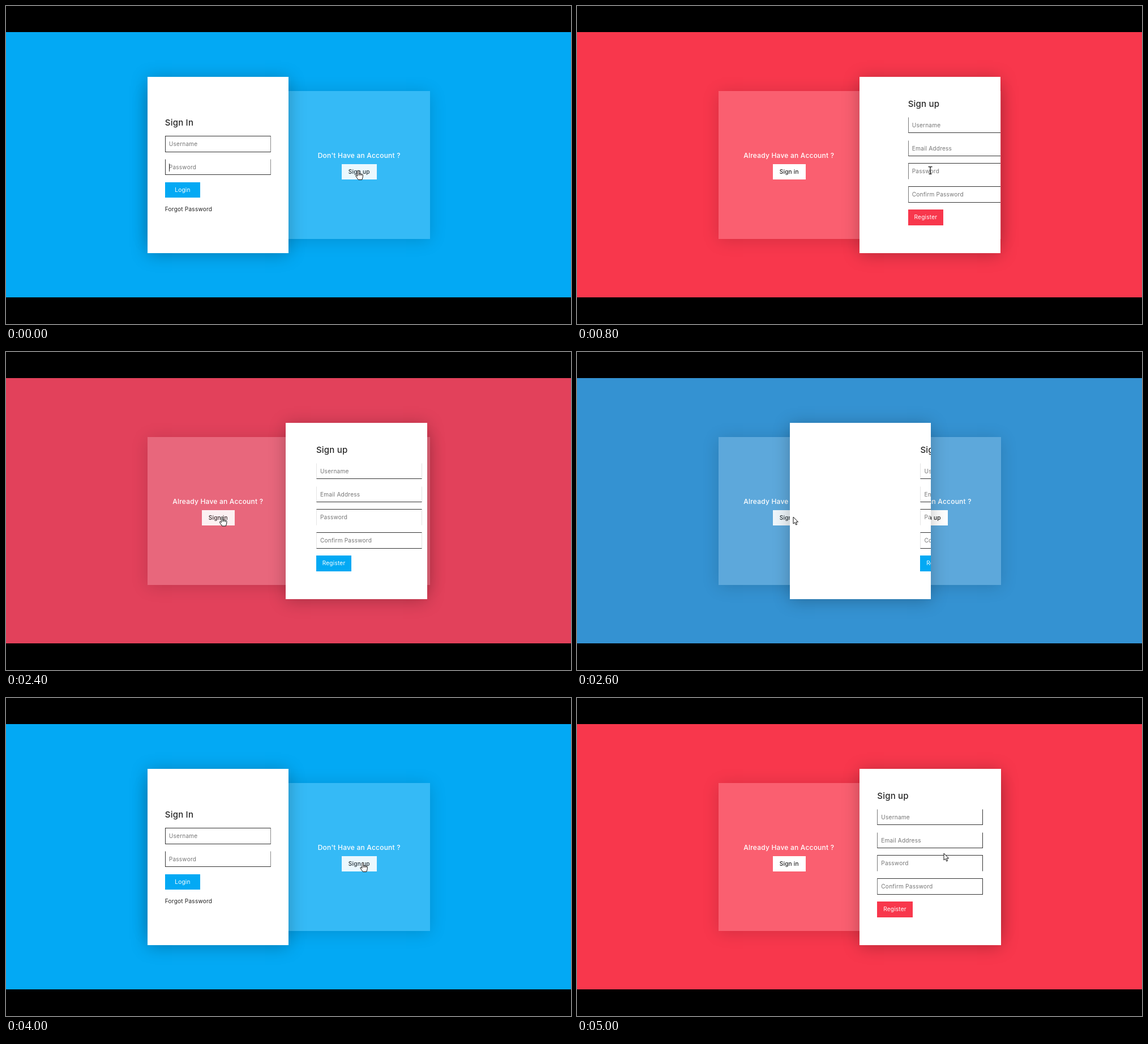
Write an HTML page that moves like this. It is 998x561 px and loops after 5.2 s.

```html
<!DOCTYPE html>
<html lang="en">
<head>
<meta charset="utf-8">
<title>Sign in / Sign up</title>
<style>
  html, body { margin: 0; width: 100%; height: 100%; overflow: hidden; background: #000; }
  #stage { position: relative; width: 998px; height: 561px; overflow: hidden;
    font: 10.1px Inter, sans-serif; letter-spacing: .02em; color: #222; }
  #stage * { position: absolute; box-sizing: border-box; white-space: nowrap; }
  #page { top: 46px; width: 998px; height: 468px; }
  #panel { left: 249.5px; top: 149.5px; width: 499px; height: 261px;
    background: rgba(255,255,255,.2); box-shadow: 0 3px 28px rgba(0,0,0,.15); }
  .box { width: 249.5px; height: 100%; }
  .box h2 { margin: 0; width: 100%; top: 105px; font-size: 12px; font-weight: 500;
    line-height: 18px; text-align: center; color: #fff; }
  .box b { top: 129px; height: 27px; line-height: 27px; text-align: center;
    font-weight: 500; background: #fff; }
  #card { top: 124.5px; width: 249.5px; height: 311px; overflow: hidden;
    background: #fff; box-shadow: 0 3px 28px rgba(0,0,0,.25); }
  .form { top: 0; width: 100%; height: 100%; }
  .form > * { left: 31.3px; }
  .form h3 { margin: 0; font-size: 15px; font-weight: 500; line-height: 24px; color: #262626; }
  .field { width: 187px; height: 28.7px; padding-left: 6px; line-height: 26.5px;
    color: #757575; border: 1px solid #333; }
  .no-top { border-top-color: transparent; }
  .no-bottom { border-bottom-color: transparent; }
  #signin .field { border-right-color: #888; }
  #signup .field { border-left-color: #777; }
  #signup.leaving .field { border-left-color: #e4e4e4; border-right-color: #e4e4e4; }
  .submit { width: 62.4px; height: 27.5px; line-height: 27px; text-align: center;
    color: #fff; background: #03a9f4; }
  #caret { left: 38px; top: 153px; width: 1px; height: 14px; background: #333; }
  #pointer { left: 0; top: 0; width: 20px; height: 24px; overflow: visible; }
  #pointer path { fill: #fff; stroke: #111; stroke-width: 1; stroke-linejoin: round; }
  #pointer #beam { fill: none; stroke-width: 1.3; }
</style>
</head>
<body>
<div id="stage">
  <div id="page"></div>
  <div id="panel">
    <div class="box" style="left:0">
      <h2>Already Have an Account ?</h2>
      <b id="toSignin" style="left:96px;width:58.5px">Sign in</b>
    </div>
    <div class="box" style="left:249.5px">
      <h2>Don't Have an Account ?</h2>
      <b id="toSignup" style="left:93.5px;width:62.5px">Sign up</b>
    </div>
  </div>
  <div id="card">
    <div class="form" id="signin">
      <h3 style="top:69px">Sign In</h3>
      <div class="field" style="top:104.5px">Username</div>
      <div class="field no-top" style="top:145.3px">Password</div>
      <div class="submit" style="top:186px">Login</div>
      <span style="top:226px;line-height:15px">Forgot Password</span>
      <i id="caret"></i>
    </div>
    <div class="form" id="signup">
      <h3 style="top:36px">Sign up</h3>
      <div class="field no-top" style="top:71.3px">Username</div>
      <div class="field no-top" style="top:112px">Email Address</div>
      <div class="field no-bottom" style="top:152.8px">Password</div>
      <div class="field" style="top:193.5px">Confirm Password</div>
      <div class="submit" id="register" style="top:234.5px">Register</div>
    </div>
  </div>
  <svg id="pointer">
    <path id="hand" d="M-1.2 8V.8Q0-.8 1.3.8V6Q2.5 4.8 3.6 6.3 5 5.3 6 6.8 7.8 6 8.3 7.8V11.5L6.8 16.5H.3L-4.2 10Q-4 8-2.3 9L-1.2 10.3ZM1.3 6V9M3.6 6.3V9M6 6.8V9.3"/>
    <path id="arrow" d="M0 0V12L2.8 9.6 4.8 14 6.7 13.1 4.8 8.9H8.6Z"/>
    <path id="beam" d="M-3.5-6.3H-1Q0-6.3 0-5.3 0-6.3 1-6.3H3.5M0-5.3V6M-2.5 6.3H2.5"/>
  </svg>
</div>
<script>
const LOOP = 5200, STEP = 200, WIDTH = 249.5;
const BLUE = [3, 169, 244], RED = [248, 55, 76];

// Each press toggles the card; span is the length of one transition.
const presses = [
  { at: 276, span: 535, active: true },
  { at: 2352, span: 500, active: false },
  { at: 4190, span: 442, active: true },
];
const pointerPath = [
  [0, 622, 290, 'hand'], [600, 622, 290, 'arrow'], [800, 624, 290, 'beam'],
  [1400, 624, 290, 'beam'], [1800, 502, 290, 'arrow'], [2200, 381, 290, 'hand'],
  [2600, 382, 291, 'arrow'], [3000, 382, 291, 'beam'], [3400, 382, 291, 'beam'],
  [3800, 548, 291, 'arrow'], [4000, 630, 290, 'hand'], [4400, 631, 288, 'arrow'],
  [5000, 648, 274, 'arrow'], [5200, 648, 274, 'arrow'],
];

const $ = id => document.getElementById(id);
const mix = (a, b, p) => a + (b - a) * p;

function bezier(x1, y1, x2, y2) {
  const at = (a, b, s) => 3 * a * s * (1 - s) ** 2 + 3 * b * s * s * (1 - s) + s ** 3;
  return x => {
    if (x <= 0) return 0;
    if (x >= 1) return 1;
    let low = 0, high = 1;
    for (let i = 0; i < 25; i++) {
      const mid = (low + high) / 2;
      if (at(x1, x2, mid) < x) low = mid; else high = mid;
    }
    return at(y1, y2, low);
  };
}
const ease = bezier(.25, .1, .25, 1), easeInOut = bezier(.42, 0, .58, 1);

function drawCard(t) {
  const press = presses.filter(p => p.at <= t).pop() || { at: -LOOP, span: 500, active: false };
  const { active } = press, k = (t - press.at) / press.span;
  const toward = p => active ? p : 1 - p;
  const early = ease(k), late = ease(k - .5);
  const signinOut = active ? early : 1 - late;
  const signupOut = active ? 1 - late : early;

  $('page').style.background = `rgb(${BLUE.map((c, i) => mix(c, RED[i], toward(early)))})`;
  $('card').style.left = WIDTH * (1 + toward(easeInOut(k))) + 'px';
  $('signin').style.left = -WIDTH * signinOut + 'px';
  $('signin').style.opacity = 1 - signinOut;
  $('signup').style.left = WIDTH * signupOut + 'px';
  $('signup').classList.toggle('leaving', !active);
  $('register').style.background = active ? `rgb(${RED})` : '';
  $('caret').style.display = t < presses[0].at ? '' : 'none';
}

function drawPointer(t) {
  const next = pointerPath.findIndex(key => key[0] > t);
  const [t0, x0, y0, kind] = pointerPath[next - 1], [t1, x1, y1] = pointerPath[next];
  const p = (t - t0) / (t1 - t0), x = mix(x0, x1, p), y = mix(y0, y1, p);
  $('pointer').style.transform = `translate(${x}px, ${y}px)`;
  for (const id of ['hand', 'arrow', 'beam']) $(id).style.display = id === kind ? '' : 'none';

  const hover = (id, center) => {
    const over = Math.abs(x - center) < 30 && y > 278;
    $(id).style.opacity = over ? .9 : 1;
  };
  hover('toSignin', 374.5);
  hover('toSignup', 623.7);
}

function frame() {
  const t = Math.floor(performance.now() % LOOP / STEP) * STEP;
  drawCard(t);
  drawPointer(t);
  requestAnimationFrame(frame);
}
frame();
</script>
</body>
</html>
```
